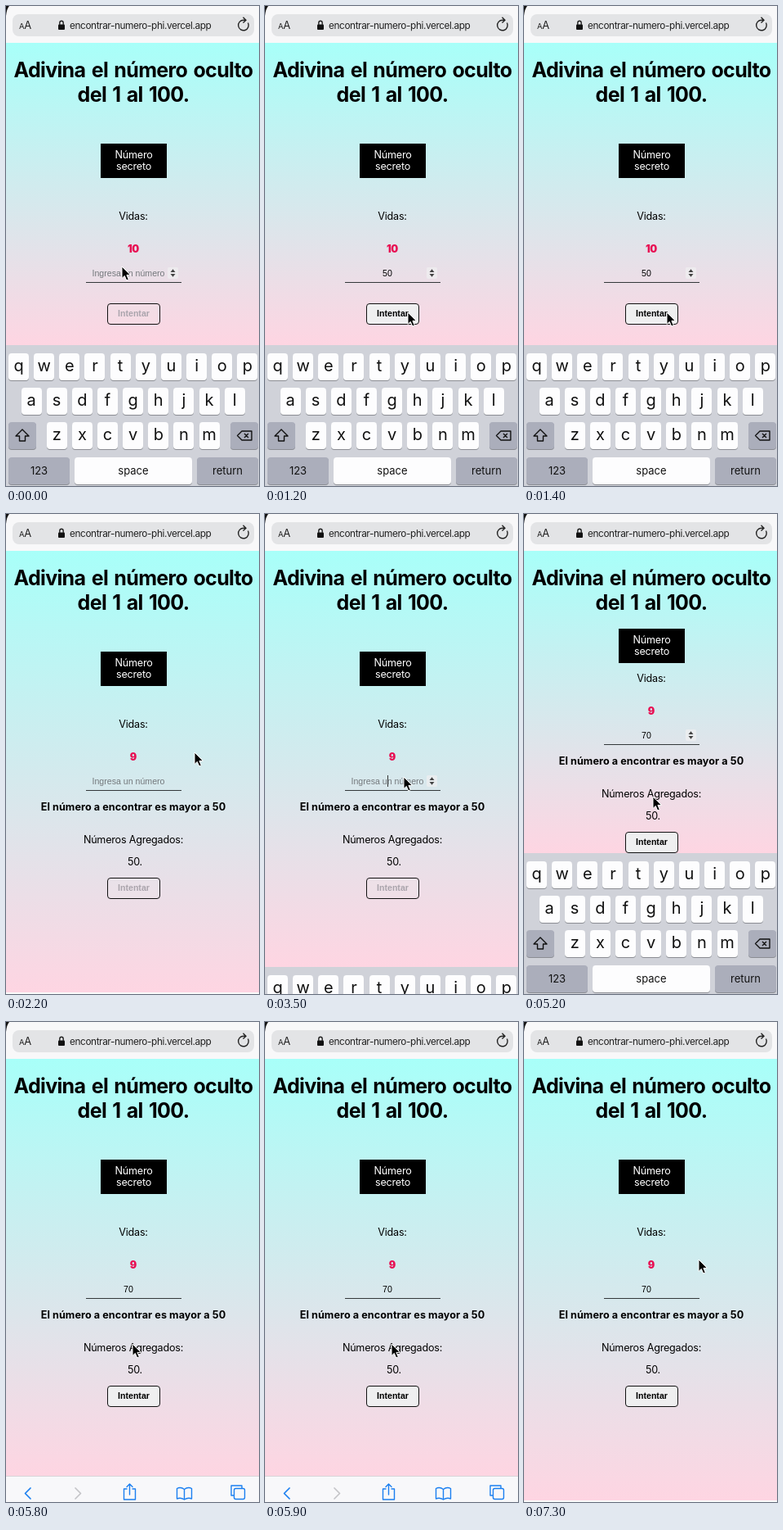
An HTML page for the animation above (8000 ms loop, 310 by 586 pixels).

```html
<!DOCTYPE html>
<html lang="es">
<head>
<meta charset="utf-8">
<title>Adivina el número</title>
<style>
@property --kb { syntax: "<length>"; inherits: true; initial-value: 414px; }
@property --bar { syntax: "<length>"; inherits: true; initial-value: 586px; }
@property --squeeze { syntax: "<length>"; inherits: true; initial-value: 0px; }
@property --btn { syntax: "<length>"; inherits: true; initial-value: 363px; }

html, body { margin: 0; width: 100%; height: 100%; overflow: hidden; background: #fafafa; }
#stage {
  position: relative; width: 310px; height: 586px; overflow: hidden;
  background: #fafafa; color: #000;
  font: 12.6px/16px Inter, "Open Sans", sans-serif; letter-spacing: -.22px;
  animation: screen 8s step-end infinite;
}
#stage *, #stage { box-sizing: border-box; }
#stage div, #stage svg, #stage h1 { position: absolute; }

/* page */
#bg {
  left: 0; top: 45px; width: 310px;
  height: calc(min(var(--kb), var(--bar), 584px) - 45px);
  background: linear-gradient(#a8fff9, #fed5e2);
}
h1 {
  margin: 0; left: 0; top: 63px; width: 312px; text-align: center; white-space: nowrap;
  font-size: 25px; line-height: 30px; font-weight: 700; letter-spacing: -.65px; word-spacing: 2px;
}
#secret {
  left: 116px; top: calc(168px - var(--squeeze) / 2); width: 81px; height: 42px;
  padding-top: 7px; background: #000; color: #fff; text-align: center; line-height: 14px;
}
#form { left: 0; top: calc(0px - var(--squeeze)); width: 312px; height: 586px; }
.line { left: 0; width: 312px; text-align: center; white-space: nowrap; }
.lives { top: 289px; font-weight: 900; color: #e80f53; }
.msg { top: 350px; font-weight: 700; letter-spacing: .08px; }
.field { left: 98px; top: 318px; width: 104px; text-align: center; white-space: nowrap; }
.field, #btn { font-family: "Liberation Sans", Arial, sans-serif; font-size: 10.6px; letter-spacing: 0; }
.hint { color: #74787c; }
#rule { left: 98px; top: 337px; width: 117px; height: 1px; background: #33383a; }
#caret { left: 150px; top: 319px; width: 1px; height: 14px; background: #333; }
#btn {
  left: 124px; top: var(--btn); width: 65px; height: 26px; line-height: 23px;
  border: 1px solid #111; border-radius: 4px; text-align: center; font-weight: 700;
  animation: button 8s step-end infinite;
}

/* browser */
#head { left: 0; top: 0; width: 310px; height: 45px; background: #f8f8f9; }
#pill { left: 8px; top: 10px; width: 296px; height: 27px; border-radius: 8px; background: #e3e4e6; }
#url { left: 78px; top: 16px; font-size: 11.8px; letter-spacing: -.4px; color: #222; white-space: nowrap; }
#aa { left: 16px; top: 15px; font-size: 13px; letter-spacing: -.3px; color: #222; white-space: nowrap; }
#aa small { font-size: 9.5px; }
#tools { left: 0; top: var(--bar); width: 310px; height: 32px; background: #f8f8fa; border-top: 1px solid #d8d3d8; overflow: hidden; }
#tools svg { left: 0; top: -2px; }

/* keyboard */
#keys { left: 0; top: var(--kb); width: 310px; height: 172px; background: #d0d2d9; }
.key {
  height: 33px; border-radius: 4px; background: #fdfdfe; box-shadow: 0 1px 0 #8b8d93;
  text-align: center; font-size: 20px; line-height: 30px; letter-spacing: 0; color: #111;
}
.word { font-size: 13px; line-height: 32px; }
.dark { background: #abaebb; }

#cursor { left: -2px; top: 0; animation: move 8s steps(4) infinite; }

@keyframes screen {
  0%     { --kb: 414px; --bar: 586px; --squeeze: 0px; --btn: 363px; }
  18.75% { --kb: 455px; --bar: 586px; --squeeze: 0px; --btn: 444px; }
  20%    { --kb: 525px; --bar: 554px; --squeeze: 0px; --btn: 444px; }
  21.25% { --kb: 586px; --bar: 554px; --squeeze: 0px; --btn: 444px; }
  22.5%  { --kb: 586px; --bar: 586px; --squeeze: 0px; --btn: 444px; }
  43.75% { --kb: 553px; --bar: 586px; --squeeze: 0px; --btn: 444px; }
  45%    { --kb: 470px; --bar: 586px; --squeeze: 0px; --btn: 444px; }
  46.25% { --kb: 414px; --bar: 586px; --squeeze: 20px; --btn: 444px; }
  47.5%  { --kb: 414px; --bar: 586px; --squeeze: 56px; --btn: 444px; }
  68.75% { --kb: 455px; --bar: 554px; --squeeze: 28px; --btn: 444px; }
  70%    { --kb: 525px; --bar: 554px; --squeeze: 0px; --btn: 444px; }
  71.25% { --kb: 586px; --bar: 554px; --squeeze: 0px; --btn: 444px; }
  75%, 100% { --kb: 586px; --bar: 586px; --squeeze: 0px; --btn: 444px; }
}
@keyframes button {
  0%, 18.75% { color: #aaa4ac; background: #efefef22; }
  5%, 52.5%, 100% { color: #000; background: #efeff0; }
}
@keyframes before { 0% { opacity: 1; } 18.75%, 100% { opacity: 0; } }
@keyframes after { 0% { opacity: 0; } 18.75%, 100% { opacity: 1; } }
@keyframes hint { 0%, 18.75% { opacity: 1; } 5%, 52.5%, 100% { opacity: 0; } }
@keyframes five { 0%, 7.5%, 100% { opacity: 0; } 5% { opacity: 1; } }
@keyframes fifty { 0%, 18.75%, 100% { opacity: 0; } 7.5% { opacity: 1; } }
@keyframes seven { 0%, 56.25%, 100% { opacity: 0; } 52.5% { opacity: 1; } }
@keyframes seventy { 0% { opacity: 0; } 56.25%, 100% { opacity: 1; } }
@keyframes spin { 0%, 41.25% { opacity: 1; } 18.75%, 68.75%, 100% { opacity: 0; } }
@keyframes caret { 0%, 48.75%, 100% { opacity: 0; } 42.5% { opacity: 1; } }
[data-show] { animation: 8s step-end infinite; }
[data-show=before] { animation-name: before; }
[data-show=after] { animation-name: after; }
[data-show=hint] { animation-name: hint; }
[data-show=five] { animation-name: five; }
[data-show=fifty] { animation-name: fifty; }
[data-show=seven] { animation-name: seven; }
[data-show=seventy] { animation-name: seventy; }
[data-show=spin] { animation-name: spin; }
[data-show=caret] { animation-name: caret; }

@keyframes move {
  0%, 8.75%        { transform: translate(143px, 317px); }
  13.75%, 18.75%   { transform: translate(176px, 373px); }
  25%, 28.75%      { transform: translate(232px, 290px); }
  33.75%, 57.5%    { transform: translate(171px, 320px); }
  62.5%, 65%       { transform: translate(159px, 344px); }
  70%, 76.25%      { transform: translate(156px, 392px); }
  82.5%, 86.25%    { transform: translate(180px, 340px); }
  91.25%, 100%     { transform: translate(215px, 289px); }
}
</style>
</head>
<body>
<div id="stage">
  <div id="bg"></div>
  <h1>Adivina el número oculto<br>del 1 al 100.</h1>
  <div id="secret">Número<br>secreto</div>
  <div id="form">
    <div class="line" style="top:249px">Vidas:</div>
    <div class="line lives" data-show="before">10</div>
    <div class="line lives" data-show="after">9</div>
    <div class="field hint" data-show="hint">Ingresa un número</div>
    <div class="field" data-show="five">5</div>
    <div class="field" data-show="fifty">50</div>
    <div class="field" data-show="seven">7</div>
    <div class="field" data-show="seventy">70</div>
    <div id="caret" data-show="caret"></div>
    <svg data-show="spin" style="left:198px;top:319px" width="13" height="14">
      <rect width="13" height="14" rx="2" fill="#efeff0" opacity=".75"/>
      <path d="M3.5 6 6.5 2.3 9.5 6ZM3.5 8 6.5 11.7 9.5 8Z" fill="#444"/>
    </svg>
    <div id="rule"></div>
    <div class="line msg" data-show="after">El número a encontrar es mayor a 50</div>
    <div class="line" style="top:390px" data-show="after">Números Agregados:</div>
    <div class="line" style="top:417px;left:2px" data-show="after">50.</div>
    <div id="btn">Intentar</div>
  </div>

  <div id="tools">
    <svg width="310" height="34" fill="none" stroke="#1b7ff0" stroke-width="1.4" stroke-linecap="round" stroke-linejoin="round">
      <path d="M30 16 23.5 22.5 30 29" stroke-width="1.7"/>
      <path d="M85 16 91.5 22.5 85 29" stroke="#c4c4c8" stroke-width="1.7"/>
      <path d="M148 17H144.5V30H158.5V17H155M151.5 24V11M148 14.5 151.5 11 155 14.5"/>
      <path d="M218.5 17.5Q214 14 209.5 16.5V29Q214 27 218.5 30Q223 27 227.5 29V16.5Q223 14 218.5 17.5V30"/>
      <path d="M279 25H276V13H289V16"/><rect x="279.5" y="16.5" width="13" height="13" rx="2"/>
    </svg>
  </div>
  <div id="keys"></div>

  <div id="head">
    <div id="pill"></div>
    <div id="aa"><small>A</small>A</div>
    <div id="url">encontrar-numero-phi.vercel.app</div>
    <svg width="310" height="44" fill="none" stroke="#222" stroke-width="1.4">
      <path d="M0 0H4Q1 3 0 12Z" fill="#111" stroke="none"/>
      <rect x="64" y="22.5" width="8" height="6.5" rx="1" fill="#111" stroke="none"/>
      <path d="M65.8 23V20.5a2.2 2.2 0 0 1 4.4 0V23"/>
      <path d="M296.5 20.5A6.3 6.3 0 1 1 291 17.2H293M290.5 13.8 294 17.2 290.5 20.5"/>
    </svg>
  </div>

  <svg id="cursor" width="14" height="20" viewBox="-1 -1 14 20">
    <path d="M0 0V14.5L3.3 11.4 5.7 17 8.3 15.9 5.9 10.4H10.5Z" fill="#000" stroke="#fff" stroke-width="1"/>
  </svg>
</div>
<script>
const board = document.getElementById('keys');

function addKey(x, y, width, label, style = '') {
  const key = document.createElement('div');
  key.className = 'key ' + style;
  key.style.cssText = `left:${x}px;top:${y}px;width:${width}px`;
  key.innerHTML = label;
  board.append(key);
}

const icon = path => `<svg style="left:7px;top:7px" width="20" height="20" fill="none"
  stroke="#111" stroke-width="1.4" stroke-linejoin="round"><path d="${path}"/></svg>`;

// first key's left edge, top, letters
[[3, 10, 'qwertyuiop'], [18.5, 52, 'asdfghjkl'], [49.7, 94, 'zxcvbnm']].forEach(([x, y, letters]) =>
  [...letters].forEach((letter, i) => addKey(x + i * 31.15, y, 25, letter)));

addKey(3, 94, 34, icon('M10 2 18 10H13.5V16H6.5V10H2Z'), 'dark');
addKey(275, 94, 34, icon('M7 4H19V15H7L1.5 9.5ZM10 7 15 12M15 7 10 12'), 'dark');
addKey(3, 137, 75, '123', 'dark word');
addKey(84, 137, 144, 'space', 'word');
addKey(234, 137, 75, 'return', 'dark word');
</script>
</body>
</html>
```
